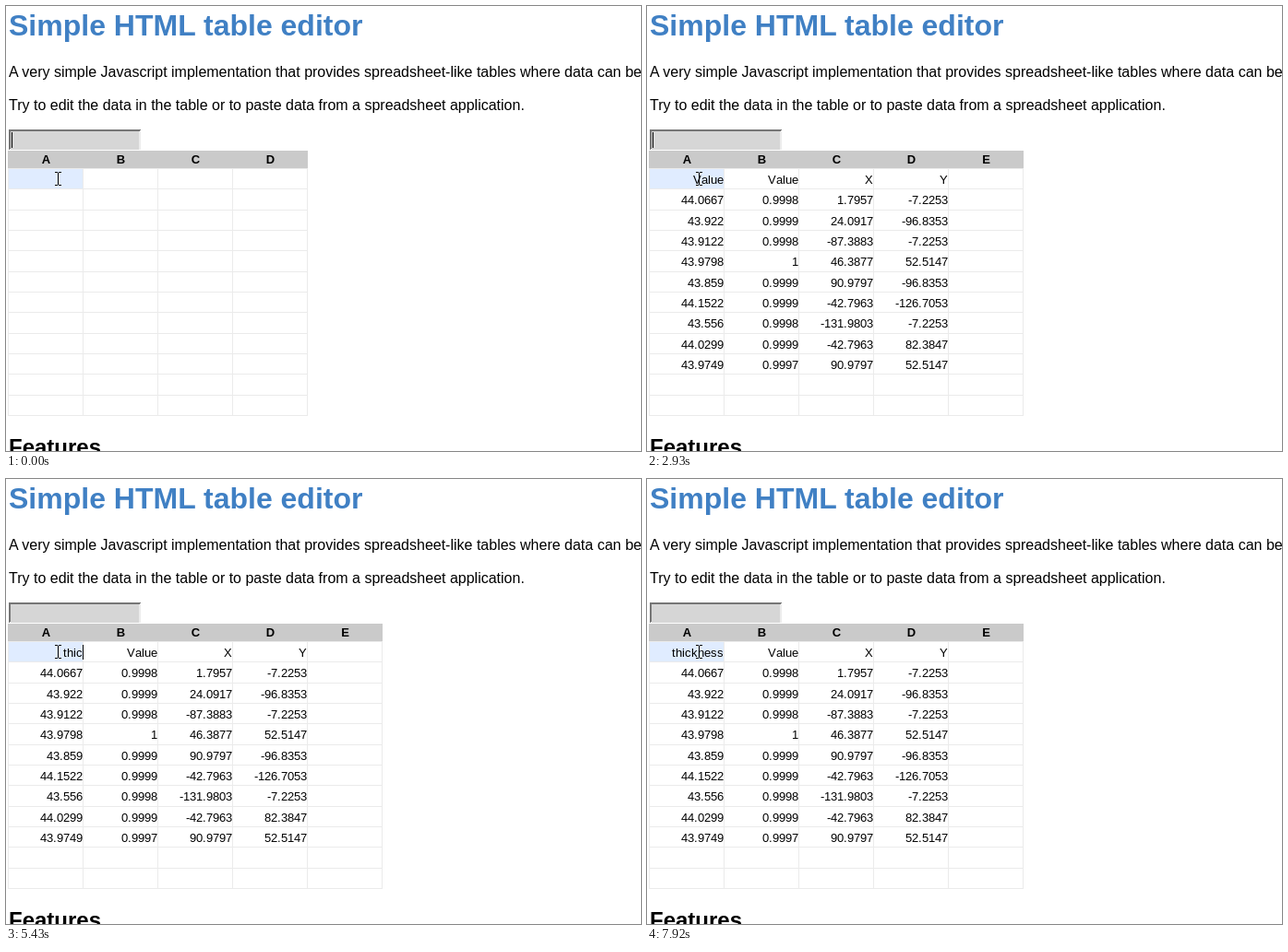
These frames come from a looping animation (688x483 px, 8 s). An HTML page:

```html
<!DOCTYPE html>
<html lang="en">
<head>
<meta charset="utf-8">
<title>Simple HTML table editor</title>
<style>
  html, body { margin: 0; width: 100%; height: 100%; overflow: hidden; background: #fff; }
  svg { display: block; width: 688px; height: 483px; font-family: "Liberation Sans", Arial, sans-serif; }
  .title { font: bold 32px "Liberation Sans", Arial, sans-serif; fill: #4080c4; }
  .intro { font-size: 16px; }
  .section { font: bold 24px "Liberation Sans", Arial, sans-serif; }
  .cell { font-size: 13px; }
  .head { font-size: 13px; font-weight: bold; text-anchor: middle; }
  .grid { fill: none; stroke: #ebebeb; }
  .caret { fill: #000; }
</style>
</head>
<body>
<svg viewBox="0 0 688 483" shape-rendering="crispEdges">
  <text class="title" x="3" y="32">Simple HTML table editor</text>
  <text class="intro" x="3" y="77">A very simple Javascript implementation that provides spreadsheet-like tables where data can be</text>
  <text class="intro" x="3" y="113">Try to edit the data in the table or to paste data from a spreadsheet application.</text>

  <g id="input">
    <path fill="#ececec" d="M3 134h143v22h-143z"/>
    <path fill="#767676" d="M3 134h143l-2 2h-139v18l-2 2z"/>
    <path fill="#d6d6d6" d="M5 136h139v20h-139z"/>
    <rect class="caret" id="inputCaret" x="6" y="137" width="1" height="17"/>
  </g>

  <rect id="header" x="2" y="157" height="19" fill="#cacaca"/>
  <rect x="3" y="177" width="80" height="21" fill="#e0ecff"/>
  <path class="grid" id="grid"/>
  <g id="labels"></g>
  <g id="data"></g>
  <text class="cell" id="edited" y="193"></text>
  <rect class="caret" id="cellCaret" x="83" y="180" width="1" height="16"/>
  <path id="pointer" fill="none" stroke="#000" d="M53 180.5h3m1 0h3M56.5 181v13M53 194.5h3m1 0h3"/>

  <text class="section" x="3" y="487">Features</text>
</svg>
<script>
const LOOP = 8000, PASTE = 1690, EDIT = 4130;
const COL = 81, LEFT = 2, TOP = 176, ROW = 67 / 3, ROWS = 12;

// Times at which each caret flips, starting from its first state
const INPUT_FLIPS = [0, 300, 860, 1260, 1810, 2400, 2930, 3450, 3880, EDIT];
const CELL_FLIPS = [EDIT, 5130, 5280, 6830, 7360, 7920];
const WORD = "thickness";
const KEYS = [EDIT, 4560, 5280, 5430, 5580, 5860, 5980, 6130, 6400];

const ROWS_TEXT = `Value Value X Y
44.0667 0.9998 1.7957 -7.2253
43.922 0.9999 24.0917 -96.8353
43.9122 0.9998 -87.3883 -7.2253
43.9798 1 46.3877 52.5147
43.859 0.9999 90.9797 -96.8353
44.1522 0.9999 -42.7963 -126.7053
43.556 0.9998 -131.9803 -7.2253
44.0299 0.9999 -42.7963 82.3847
43.9749 0.9997 90.9797 52.5147`;

const byId = id => document.getElementById(id);
const show = (el, on) => el.setAttribute("visibility", on ? "visible" : "hidden");
const rowY = r => Math.round(TOP + r * ROW);
const passed = (times, t) => times.filter(at => at <= t).length;

const pen = document.createElement("canvas").getContext("2d");
pen.font = '13px "Liberation Sans", Arial, sans-serif';

function addText(parent, cls, y) {
  const el = document.createElementNS("http://www.w3.org/2000/svg", "text");
  el.setAttribute("class", cls);
  el.setAttribute("y", y);
  return parent.appendChild(el);
}

// Right-aligned text whose glyphs sit on whole pixels
function setRight(el, text, right) {
  const steps = [...text].map(c => Math.round(pen.measureText(c).width));
  let x = right - steps.reduce((a, b) => a + b, 0);
  el.setAttribute("x", steps.map(s => (x += s) - s).join(" "));
  el.textContent = text;
}

const labels = [..."ABCDE"].map((name, i) => {
  const el = addText(byId("labels"), "head", 171);
  el.setAttribute("x", 43.5 + i * COL);
  el.textContent = name;
  return el;
});

ROWS_TEXT.split("\n").forEach((line, r) => line.split(" ").forEach((value, c) => {
  if (r || c) setRight(addText(byId("data"), "cell", rowY(r) + 17), value, 83 + c * COL);
}));

function gridPath(cols) {
  let d = "";
  for (let r = 0; r <= ROWS; r++) d += `M${LEFT} ${rowY(r) + .5}h${cols * COL + 1}`;
  for (let c = 0; c <= cols; c++) d += `M${LEFT + c * COL + .5} ${TOP}v${ROWS * ROW + 1}`;
  return d;
}

let lastText, lastCols;
function draw(now) {
  const t = now % LOOP;
  const cols = t < PASTE ? 4 : 5;
  const text = t < PASTE ? "" : t < EDIT ? "Value" : WORD.slice(0, passed(KEYS, t));

  if (cols !== lastCols) {
    byId("grid").setAttribute("d", gridPath(cols));
    byId("header").setAttribute("width", cols * COL + 1);
    show(labels[4], cols > 4);
    show(byId("data"), cols > 4);
    lastCols = cols;
  }
  if (text !== lastText) setRight(byId("edited"), lastText = text, 83);
  show(byId("inputCaret"), passed(INPUT_FLIPS, t) % 2);
  show(byId("cellCaret"), passed(CELL_FLIPS, t) % 2);
}

const start = performance.now();
function tick() {
  draw(performance.now() - start);
  requestAnimationFrame(tick);
}
tick();
</script>
</body>
</html>
```
